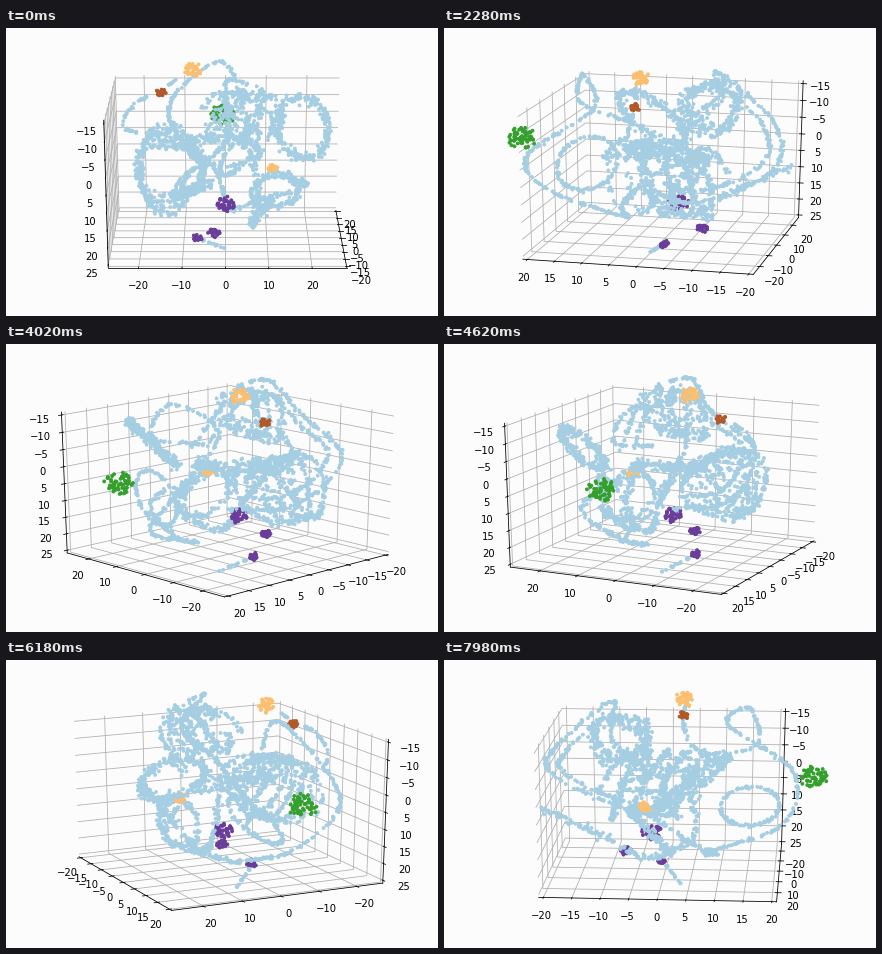
These frames come from a looping animation (432x288 px, 8 s). A matplotlib script:

```python
import numpy as np
import matplotlib.pyplot as plt
from matplotlib.animation import FuncAnimation

FRAMES, LOOP = 134, 8000
BLUE, GREEN, ORANGE = "#a6cee3", "#33a02c", "#fdbf6f"
PURPLE, BROWN = "#6a3d9a", "#b15928"
PAPER = "#fcfcfc"
XLIM, YLIM, ZLIM = (-27, 28), (-20.83, 20.83), (25.83, -15.83)

rng = np.random.default_rng(7)
cloud, colors = [], []


def add(points, color=BLUE, spread=0.0):
    cloud.append(points + rng.normal(0, 1, points.shape) * spread)
    colors.extend([color] * len(points))


def strand(knots, gap=1.9, spread=0.7):
    """Catmull-Rom curve through the knots, dotted about every `gap` units."""
    k = np.array(knots, float)
    k = np.vstack([2 * k[0] - k[1], k, 2 * k[-1] - k[-2]])
    t = np.linspace(0, 1, 40, endpoint=False)[:, None]
    p = np.vstack([0.5 * (2 * b + (c - a) * t + (2 * a - 5 * b + 4 * c - d) * t**2
                          + (3 * b - a - 3 * c + d) * t**3)
                   for a, b, c, d in zip(k, k[1:], k[2:], k[3:])])
    s = np.r_[0, np.cumsum(np.linalg.norm(np.diff(p, axis=0), axis=1))]
    u = rng.uniform(0, s[-1], int(s[-1] / gap))
    add(np.column_stack([np.interp(u, s, q) for q in p.T]), BLUE, spread)


def coil(center, size, axis, turns, n, spread):
    """Helix around one axis; a single turn closes into a leaning ring."""
    t = rng.uniform(0, 1, n)
    a = 2 * np.pi * turns * t
    r = 0.9 + 0.1 * np.sin(3.1 * a) * (turns > 1)
    i, j = [m for m in range(3) if m != axis]
    p = np.empty((n, 3))
    p[:, i], p[:, j] = r * np.cos(a), r * np.sin(a)
    p[:, axis] = np.cos(a - 2) / turns + (1 - 1 / turns) * (2 * t - 1)
    add(center + p * size, BLUE, spread)


def clump(center, radius, color):
    v = rng.normal(size=(int(4.2 * radius), 3))
    v /= np.linalg.norm(v, axis=1)[:, None]
    add(center + v * radius * rng.uniform(0.5, 1.1, (len(v), 1)) * (1, 1, 0.75), color)


# tall loop, wide side arc and its sweep back to the middle
strand([(-3, 35, 45), (12, 90, 58), (-8, 82, 90), (-50, 60, 65), (-59, 126, 18),
        (-14, 117, -26), (0, 37, -53)])
# hook beside the brown group
strand([(-80, 12, 68), (-95, 12, 58), (-104, 18, 36), (-70, 46, 24)])
# dome and big outer arc, with a smaller copy inside
dome = np.array([(50, 0, 30), (50, -48, 70), (0, -52, 96), (0, -108, 52),
                 (-45, -119, 15), (-50, -45, -20), (-15, 15, -20)])
for scale in (1, 0.82):
    strand(dome.mean(0) + (dome - dome.mean(0)) * scale, 2, 0.9)
# lower tube
strand([(42, -121, 1), (36, -64, -27), (24, -15, -53), (32, 32, -25), (14, 18, 30)],
       1.3, 1.8)
strand([(45, -17, 0), (80, 30, -24), (30, 52, -45), (0, 37, -53)], 1.7, 1.2)
# dotted tails
strand([(-63, 15, 76), (-45, 17, 87)], 2.5, 0.3)
strand([(-27, -2, -72), (-2, 16, -86)], 2, 0.4)

coil((-58, -16, 3), (35, 60, 35), 1, 4.6, 560, 1.6)
coil((8, -45, 62), (40, 28, 24), 0, 3.2, 300, 2.2)
coil((75, 32, 34), (29, 32, 27), 1, 1, 260, 2.4)
coil((48, -12, -20), (26, -20, 22), 1, 1, 150, 1.8)
coil((12, 85, -2), (20, 32, 26), 0, 1, 120, 0.8)
coil((-5, -5, 18), (40, 42, 9), 2, 1.6, 180, 1.2)

clump((-6, 148, 24), 14, GREEN)
clump((-34, 17, 93), 9, ORANGE)
clump((45, -17, 3), 6, ORANGE)
clump((-66, 14, 72), 5, BROWN)
clump((-2, -14, -33), 10, PURPLE)
clump((-14, -41, -55), 6, PURPLE)
clump((-31, -7, -69), 5, PURPLE)

# stage units to axis units
px, py, ph = np.vstack(cloud).T
x = 0.5 + px / 231 * (XLIM[1] - XLIM[0])
y = py / 231 * (YLIM[1] - YLIM[0])
z = 5 + ph / 141 * (ZLIM[1] - ZLIM[0])

plt.rcParams["font.family"] = "DejaVu Sans"
fig = plt.figure(figsize=(6, 4), dpi=72, facecolor=PAPER)
ax = fig.add_axes([0.025, 0.0375, 0.95, 0.925], projection="3d", facecolor=PAPER)
ax.apply_aspect = lambda position=None: None  # fill the wide rectangle
ax.set_box_aspect((1, 1, 1), zoom=0.9468)
ax.scatter(x, y, z, c=colors, s=8, linewidths=1, depthshade=False)
ax.set(xlim=XLIM, ylim=YLIM, zlim=ZLIM)
ax.set_xticks(range(-20, 21, 10))
ax.set_yticks(range(-20, 21, 5))
ax.set_zticks(range(-15, 26, 5))
for axis in (ax.xaxis, ax.yaxis, ax.zaxis):
    axis.set_pane_color(PAPER)


def update(i):
    azim = -90 - 2 * i
    ax.view_init(elev=20, azim=azim)
    # keep the z axis on the edge near in y and far in x
    ax.zaxis.set_ticks_position("upper" if np.sin(np.radians(azim)) > 0 else "lower")
    # sparser y ticks while that axis points into the depth is handled by spacing below
    ax.set_yticks(range(-20, 21, 5))


anim = FuncAnimation(fig, update, frames=FRAMES, interval=LOOP / FRAMES, repeat=True,
                     repeat_delay=0, init_func=lambda: update(0), blit=False)
plt.show()
```
